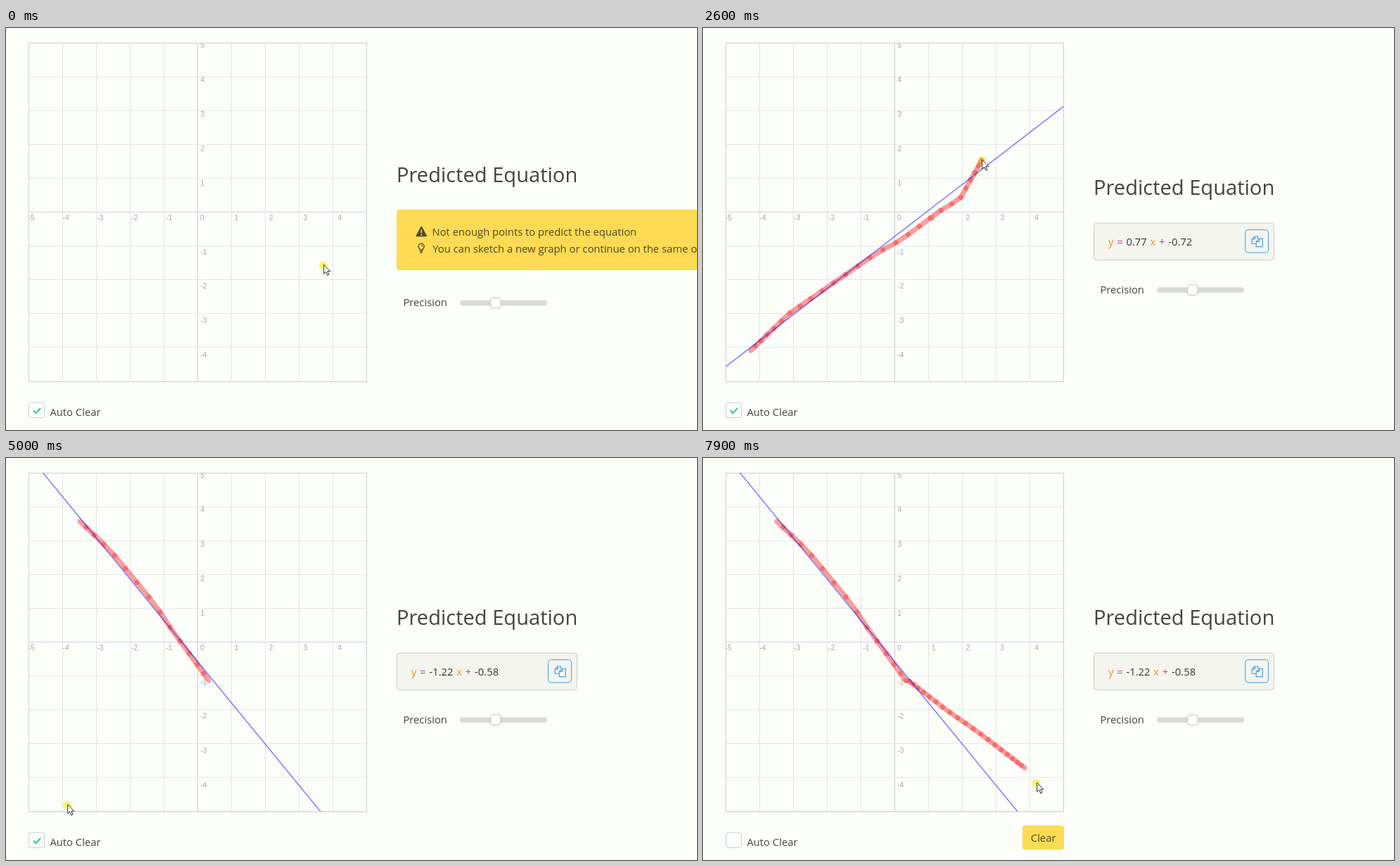
An HTML page that plays this animation: 982x571 px, repeating every 8000 ms.

```html
<!DOCTYPE html>
<html lang="en">
<head>
<meta charset="utf-8">
<title>Predicted Equation</title>
<style>
  html, body { margin: 0; width: 100%; height: 100%; overflow: hidden; background: #fcfefa; }
  svg { display: block; width: 100%; height: 100%; }
  text { font: 14.8px "Open Sans", "Noto Sans", sans-serif; fill: #444; white-space: pre; }
  .title { font-size: 29.1px; }
  .axis text { font: 10px "Liberation Sans", Arial, sans-serif; fill: #a6a8a6; }
  .grid { shape-rendering: crispEdges; }
  .ink line { stroke: #fa3c3c; stroke-opacity: .5; stroke-width: 7; stroke-linecap: round; }
  .on-yellow, .alert text { fill: #514724; }
  .formula { word-spacing: .9px; fill: #333; }
  .var { fill: #f0932b; }
  .op { fill: #c2389f; }
  .fit { stroke: #00f; stroke-opacity: .5; stroke-width: 1.5; }
</style>
</head>
<body>
<svg viewBox="0 0 982 571">
  <defs>
    <clipPath id="plot"><rect x="32" y="21" width="481" height="481"/></clipPath>
  </defs>

  <g class="grid" id="grid"></g>
  <g class="axis" id="axis" clip-path="url(#plot)"></g>
  <g class="ink" id="ink"></g>
  <g clip-path="url(#plot)"><line class="fit" id="fit"/></g>

  <text class="title" id="title" x="555" y="219">Predicted Equation</text>

  <g class="alert" id="alert">
    <rect x="555" y="258" width="440" height="86" rx="4" fill="#fddb54"/>
    <path d="M590.3 282.5L597.3 295.5H583.3Z" fill="#514724" stroke="#514724" stroke-width="1.6" stroke-linejoin="round"/>
    <path d="M590.3 286.5V291M590.3 292.6V294.4" stroke="#fddb54" stroke-width="1.8"/>
    <path d="M588.3 315.5C588.3 313 585.9 312.6 585.9 310.4A4.2 4.2 0 0 1 594.3 310.4C594.3 312.6 592 313 592 315.5ZM588.2 317.5H592M589 319.4H591.3M590 308.6Q591.8 308.6 592 310.3"
      fill="none" stroke="#514724" stroke-width="1.3"/>
    <text x="605.5" y="295">Not enough points to predict the equation</text>
    <text x="606.3" y="319">You can sketch a new graph or continue on the same one</text>
  </g>

  <g id="result">
    <rect x="555.5" y="277" width="256" height="52.5" rx="4" fill="#f5f5f0" stroke="#cbcdc7"/>
    <text class="formula" x="576" y="309"><tspan class="var">y</tspan> <tspan class="op">=</tspan> <tspan id="slope"></tspan> <tspan class="var">x</tspan> <tspan class="op">+</tspan> <tspan id="shift"></tspan></text>
    <rect x="770.5" y="286.5" width="33" height="32.5" rx="4" fill="#f3f5f2" stroke="#4a9fd8"/>
    <path d="M786 306.5H780.2V300L784.2 296H788.5V299M784.2 296V300H780.2M786.2 303.4L790.4 299.2H795.2V310.6H786.2ZM790.4 299.2V303.4H786.2"
      fill="none" stroke="#4a9fd8" stroke-width="1.2" stroke-linejoin="round"/>
  </g>

  <g id="slider">
    <text x="564.4" y="395">Precision</text>
    <rect x="645" y="386.8" width="124" height="7.6" rx="3.8" fill="#d8dbd8"/>
    <rect x="688.5" y="383.3" width="14.6" height="14.6" rx="3.5" fill="#fff" stroke="#bcc0bc"/>
  </g>

  <rect id="halo" x="31.7" y="531.2" width="23.6" height="23" rx="2" fill="none" stroke="#dde5e0" stroke-width="2"/>
  <rect x="32.5" y="532" width="22" height="21.5" rx="3" fill="#fff" stroke="#c3cfd0"/>
  <path id="tick" d="M39 543.5L42.4 547L49.2 540" fill="none" stroke="#33cc78" stroke-width="2"/>
  <text x="62.4" y="551">Auto Clear</text>

  <g id="clear">
    <rect x="454" y="522" width="59" height="34.5" rx="4" fill="#fddb54"/>
    <text class="on-yellow" x="465.8" y="545">Clear</text>
  </g>

  <g id="pointer">
    <circle r="5.8" fill="#f9f46c" style="mix-blend-mode:multiply"/>
    <path transform="translate(.7 -.8) scale(1.06)" d="M0 0V12.2L2.8 9.6L4.8 14.2L6.8 13.3L4.8 8.9H8.6Z" fill="#fff" stroke="#222" stroke-width=".9"/>
  </g>
</svg>

<script>
const $ = id => document.getElementById(id);
const LOOP = 8000, TICK = 100, UNIT = 48, OX = 272.5, OY = 261.5;

function set(el, attrs) {
  for (const k in attrs) el.setAttribute(k, attrs[k]);
  return el;
}
function add(parent, tag, attrs, text = "") {
  const el = set(document.createElementNS("http://www.w3.org/2000/svg", tag), attrs);
  el.textContent = text;
  parent.append(el);
  return el;
}

// Grid and labels
for (let i = -5; i < 5; i++) {
  const x = OX + i * UNIT, y = OY + i * UNIT, label = i * 48.85;
  if (i > -5) {
    add($("grid"), "line", { x1: x, x2: x, y1: 21, y2: 502, stroke: i ? "#e2e4e6" : "#c9cdcc" });
    add($("grid"), "line", { x1: 32, x2: 513, y1: y, y2: y, stroke: i ? "#e5e7ee" : "#d5cfe8" });
  }
  add($("axis"), "text", { x: 276 + label, y: 273 }, i);
  if (i) add($("axis"), "text", { x: 276.5, y: 272.7 + label }, -i);
}
add($("grid"), "rect", { x: 32.5, y: 21.5, width: 480, height: 480.5, fill: "none", stroke: "#c6d2d3" });

const clamp = v => Math.max(0, Math.min(1, v));
const ease = u => (u + (1 - Math.cos(Math.PI * u)) / 2) / 2;

// Point at fraction f of the length of a polyline
function along(path, f) {
  const lens = path.slice(1).map((p, i) => Math.hypot(p[0] - path[i][0], p[1] - path[i][1]));
  let left = f * lens.reduce((a, b) => a + b), i = 0;
  while (i < lens.length - 1 && left > lens[i]) left -= lens[i++];
  const [a, b] = [path[i], path[i + 1]], k = left / lens[i];
  return [a[0] + (b[0] - a[0]) * k, a[1] + (b[1] - a[1]) * k];
}

// Pointer legs in order; those with dots leave ink, the others start where the last one ended
const legs = [
  { from: 0, to: 800, path: [[451, 337], [68, 458]] },
  { from: 1300, to: 2100, dots: 26, gone: 3800,
    path: [[68, 458], [122, 406], [248, 319], [280, 302], [338, 259], [365, 243], [396, 188]] },
  { from: 3000, to: 3500, path: [[105, 90]] },
  { from: 3900, to: 4300, dots: 14, gone: LOOP,
    path: [[105, 90], [149, 132], [215, 212], [227, 232], [288, 316]] },
  { from: 4400, to: 5000, path: [[87, 493]] },
  { from: 5000, to: 5400, path: [[43, 544]] },
  { from: 5800, to: 6300, path: [[294, 315]] },
  { from: 6400, to: 7200, dots: 20, gone: LOOP,
    path: [[288, 316], [292, 316], [346, 358], [392, 390], [457, 440]] },
  { from: 7300, to: 7900, path: [[474, 462]] }
];
const strokes = legs.filter(leg => leg.dots);
const fits = [
  { at: 2200, a: 0.77, b: -0.72 },
  { at: 4400, a: -1.22, b: -0.58 }
];

legs.forEach((leg, i) => {
  if (leg.path.length < 2) leg.path.unshift(legs[i - 1].path.at(-1));
});
for (const s of strokes) {
  s.lines = Array.from({ length: s.dots }, (_, i) => {
    const [x1, y1] = along(s.path, ease(i / s.dots));
    const [x2, y2] = along(s.path, ease((i + 1) / s.dots));
    return add($("ink"), "line", { x1, y1, x2, y2 });
  });
}

const show = (id, on) => { $(id).style.display = on ? "" : "none"; };
const place = (id, x, y) => set($(id), { transform: `translate(${x} ${y})` });

function progress(leg, t) {
  const u = clamp((t - leg.from) / (leg.to - leg.from));
  return leg.dots ? Math.floor(u * leg.dots + 1e-6) / leg.dots : u;
}

function showFit({ a, b }) {
  const y = x => OY - (a * x + b) * UNIT;
  set($("fit"), { x1: OX - 5 * UNIT, y1: y(-5), x2: OX + 5 * UNIT, y2: y(5) });
  $("slope").textContent = a.toFixed(2);
  $("shift").textContent = b.toFixed(2);
}

function render(t) {
  for (const s of strokes) {
    const shown = t < s.gone ? progress(s, t) * s.dots : 0;
    s.lines.forEach((line, i) => { line.style.display = i < shown - .5 ? "" : "none"; });
  }
  const fit = fits.filter(f => t >= f.at).pop();
  if (fit) showFit(fit);
  show("fit", fit);
  show("result", fit);
  show("alert", !fit);
  place("title", 0, fit ? 18 : 0);
  place("slider", 0, fit ? -18.5 : 0);

  const manual = t >= 5600;
  show("tick", !manual);
  show("clear", manual);
  show("halo", manual && t < 6500);

  const leg = legs.filter(l => t >= l.from).pop();
  place("pointer", ...along(leg.path, ease(progress(leg, t))));
}

const begin = performance.now();
function loop(now) {
  const t = Math.max(0, now - begin) % LOOP;
  render(Math.floor(t / TICK) * TICK);
  requestAnimationFrame(loop);
}
render(0);
requestAnimationFrame(loop);
</script>
</body>
</html>
```
